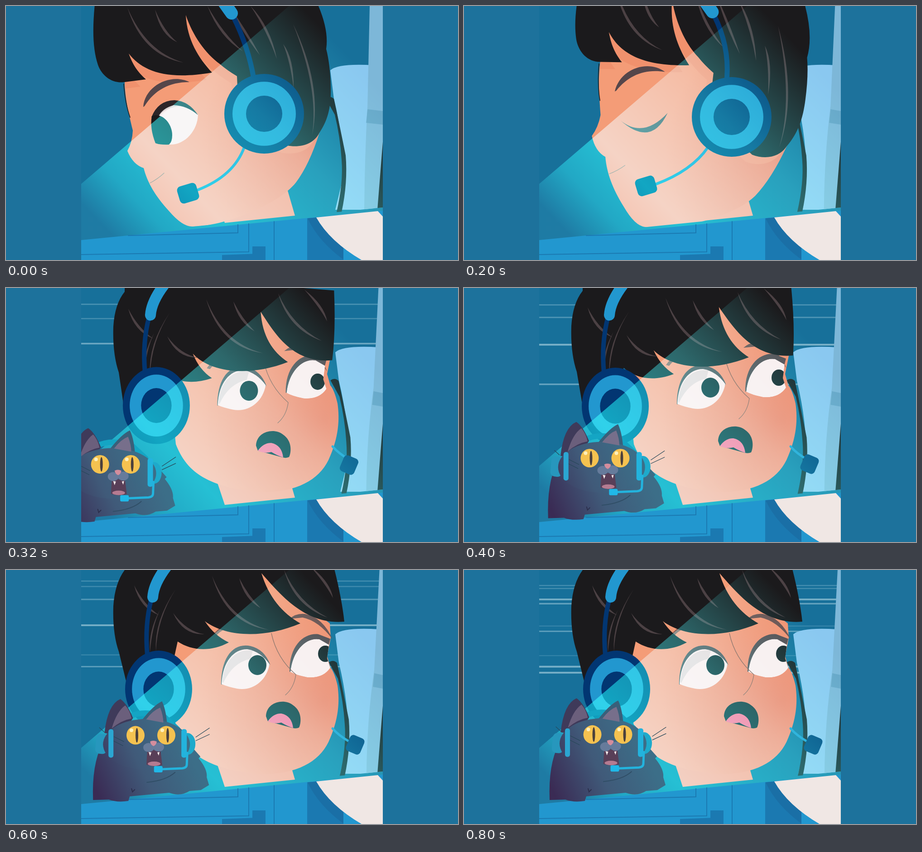
Animation of 998 by 561 pixels, one loop 0.88 s. Source, as an HTML page with a canvas:

```html
<!DOCTYPE html>
<html lang="en">
<head>
<meta charset="utf-8">
<title>Headset surprise</title>
<style>
html, body { margin: 0; width: 100%; height: 100%; overflow: hidden; background: #1d729c; }
canvas { display: block; }
</style>
</head>
<body>
<canvas id="stage" width="998" height="561"></canvas>
<script>
const ctx = document.getElementById('stage').getContext('2d');
const LOOP = 880, BLINK = 200, FRONT = 280, TURN = 320;
const HAIR = '#1b1a1c', STREAK = '#4c4144', LASH = '#55464a', WHITE = '#f8eeee';
const NECK = '#f29674', NAVY = '#023672', BLUE = '#2297cf', LINE = '#1b79b1', CYAN = '#23b3dd';

const skin = ctx.createRadialGradient(700, 290, 0, 700, 290, 270);
skin.addColorStop(0, '#ea7c5c');
skin.addColorStop(1, '#f49c77');

const fur = ctx.createLinearGradient(195, 490, 400, 400);
fur.addColorStop(0, '#3a2b54');
fur.addColorStop(.5, '#405a79');
fur.addColorStop(1, '#3c6e88');

const light = ctx.createLinearGradient(210, 480, 680, 30);
light.addColorStop(0, 'rgb(8,20,26)');
light.addColorStop(.14, 'rgb(12,100,108)');
light.addColorStop(.3, 'rgb(16,142,146)');
light.addColorStop(.65, 'rgb(20,86,88)');
light.addColorStop(1, '#000');

function fill(path, color) {
  ctx.fillStyle = color;
  ctx.fill(new Path2D(path));
}

function stroke(path, color, width) {
  ctx.strokeStyle = color;
  ctx.lineWidth = width;
  ctx.stroke(new Path2D(path));
}

function oval(x, y, rx, ry, color) {
  ctx.fillStyle = color;
  ctx.beginPath();
  ctx.ellipse(x, y, rx, ry, 0, 0, 7);
  ctx.fill();
}

function box(x, y, w, h, r, color, turn = 0) {
  shifted(x, y, () => {
    ctx.rotate(turn);
    ctx.fillStyle = color;
    ctx.beginPath();
    ctx.roundRect(-w / 2, -h / 2, w, h, r);
    ctx.fill();
  });
}

function shifted(x, y, draw) {
  ctx.save();
  ctx.translate(x, y);
  draw();
  ctx.restore();
}

function clipped(path, draw) {
  ctx.save();
  ctx.clip(new Path2D(path));
  draw();
  ctx.restore();
}

// Moves every point of a path by a rule.
function warp(path, move) {
  return path.replace(/(-?\d+) (-?\d+)/g, (_, x, y) => move(+x, +y).join(' '));
}

// Tapered hair strands spread evenly from the first to the last.
function fan(first, last = first, count = 2) {
  for (let i = 0; i < count; i++) {
    const [x, y, cx, cy, ex, ey] = first.map((v, j) => v + (last[j] - v) * i / (count - 1));
    fill(`M${x} ${y}Q${cx - 4} ${cy + 4} ${ex} ${ey}Q${cx + 4} ${cy - 4} ${x} ${y}Z`, STREAK);
  }
}

function random(seed) {
  const v = Math.sin(seed * 127.1) * 43758.5453;
  return v - Math.floor(v);
}

function earphone(x, y, rx, ry) {
  oval(x, y, rx, ry, NAVY);
  oval(x, y, rx * .795, ry * .805, BLUE);
  oval(x, y, rx * .455, ry * .455, NAVY);
}

function neck() {
  fill('M465 425L483 479L638 463L622 408Z', NECK);
}

function mouth(x, y) {
  shifted(x, y, () => {
    fill('M493 406C494 374 533 366 552 381C575 396 570 424 566 431Q560 434 552 432L497 417Z', HAIR);
    fill('M497 417Q510 399 527 400Q550 405 553 432Q540 428 527 420Q511 424 497 417Z', '#ef668e');
  });
}

function profile(t) {
  const k = Math.min(t / 120, 1.4);
  const face = 'M262 160C262 200 268 225 280 275Q279 300 268 320Q280 350 304 358C312 390 330 420 360 453Q390 488 412 487C480 487 600 440 640 390Q670 350 692 280L600 100L397 10L270 100Z';
  const hair = 'M200 -40C190 40 190 90 203 130C212 155 235 172 262 168L309 162C290 145 280 130 271 105C300 142 350 165 455 147C425 115 400 75 397 20C412 65 440 105 472 128Q488 142 510 155L511 180L560 270L620 308C650 314 680 305 692 280C712 250 718 220 717 180Q716 130 707 95Q715 40 670 -40Z';
  neck();
  ctx.save();
  ctx.transform(1, .11 * k, -.115 * k, 1 + .05 * k, 47 * k, -69 * k);
  fill(face, skin);
  clipped(face, () => shifted(-12, 16, () => fill(hair, '#f0916d')));
  stroke('M260 172Q263 215 274 246', HAIR, 1.5);
  fill(hair, HAIR);
  fan([268, 3, 305, 105, 392, 125], [329, 8, 345, 60, 378, 80]);
  fan([445, 0, 475, 65, 523, 100], [540, 0, 580, 50, 598, 117], 3);
  fan([612, 84, 632, 120, 635, 182], [634, 40, 695, 180, 676, 285]);
  fill('M303 223C307 175 365 148 405 168C360 168 328 186 306 221Z', LASH);
  if (t >= BLINK) {
    fill('M325 280Q380 310 424 250Q400 325 325 280Z', LASH);
  } else {
    fill('M330 240Q345 214 375 216Q405 220 424 240C423 275 395 308 360 306L335 302Z', WHITE);
    fill('M326 245Q345 212 380 217L392 221Q350 222 336 246Z', '#ddd5d5');
    fill('M321 246Q335 209 372 208Q404 210 424 241Q400 220 370 219Q345 226 336 245Z', '#2c2528');
    fill('M322 243C345 234 367 260 367 285Q367 300 360 306Q342 307 330 303Q317 270 322 243Z', HAIR);
  }
  stroke('M318 391Q335 382 349 369', '#9b6552', 1.2);
  ctx.restore();

  shifted(36 * k, -2 * k, () => {
    stroke(`M502 24Q535 90 ${547 - 12 * k} 160`, NAVY, 11);
    stroke('M481 -8L498 16', BLUE, 28);
  });
  stroke(`M${526 + 9 * k} 312Q503 ${375 - 8 * k} 424 ${406 - 9 * k}`, BLUE, 6);
  box(402, 413.5 - 11.5 * k, 44, 39, 9, NAVY, -.29);
  earphone(570 + 15 * k, 238 + 5 * k, 88, 88);
}

function front() {
  stroke('M690 382L706 392', BLUE, 6);
  box(718, 399, 37, 40, 8, NAVY, .45);
  neck();
  fill('M341 180L318 313C340 345 370 410 430 445C500 478 600 470 650 440C700 400 725 330 726 280L715 200L600 80L400 100Z', skin);
  oval(600, 262, 48, 36, '#f0906a40');
  oval(462, 272, 48, 34, '#f0906a28');
  fill('M557 297Q630 318 664 254Q661 335 557 297ZM405 306Q475 326 514 274Q485 345 405 306Z', LASH);
  fill('M557 297Q590 300 603 299L594 308ZM405 306Q440 315 466 311L452 318Z', HAIR);
  fill('M379 253Q430 193 494 251Q436 212 379 253ZM544 255C550 215 600 193 640 199L640 208Q580 203 544 255Z', LASH);
  fill('M290 0Q258 40 257 90Q257 130 262 160L340 215L341 183L378 188Q362 150 358 113C385 160 430 190 510 191C500 150 499 100 502 62C515 100 545 150 565 175Q600 200 637 197C638 240 650 290 690 306Q712 310 718 295Q726 200 727 80Q722 60 725 40Q723 15 716 0Z', HAIR);
  fan([395, 25, 420, 115, 500, 147], [453, 28, 465, 75, 500, 102]);
  fan([562, 0, 575, 85, 643, 132], [640, 0, 700, 60, 718, 152], 3);
  fan([268, 158, 280, 100, 314, 45]);
  fan([280, 33, 315, 8, 382, 0]);
  stroke('M532 234Q536 285 550 324Q548 345 536 366', '#7a4b40', 1.2);
  mouth(0, 0);
  stroke('M257 46Q239 100 239 168', NAVY, 11);
  stroke('M286 -8Q263 16 261 39', BLUE, 25);
  earphone(260, 247, 84, 88);
}

// The head eases into its final pose; the hair trails behind the features.
function turned(t) {
  const drag = Math.min((Math.max(0, 600 - t) / 200) ** 2, 1.3);
  const rest = drag * drag;
  const hair = warp(
    'M262 0Q240 30 237 80Q235 140 249 180L265 245L340 240L372 190L379 158C410 178 450 182 492 160Q460 145 439 113C485 148 570 152 650 118C610 95 580 60 564 7C604 52 660 122 747 114Q740 50 715 -40L262 -40Z',
    (x, y) => {
      const inner = Math.max(0, Math.min(1, (x - 250) / 140));
      const reach = Math.max(0, Math.min(1, (x - 240) / 300));
      return [x - .18 * y * inner * drag, y + (4 + 31 * reach) * drag];
    });
  neck();
  fill('M379 130L360 200L375 345C400 410 450 440 560 451C640 452 690 425 712 380C735 330 737 290 732 255Q725 225 716 215L709 190L717 150L715 118L560 0Z', skin);
  shifted(-9 * drag, 24 * drag, () => {
    fill('M626 108Q640 95 660 97Q700 105 721 153Q690 112 655 105Z', '#6b4c4a');
    fill('M455 146Q465 130 485 122L497 128Q475 130 462 148Z', '#8a5c52');
  });
  shifted(-5 * rest, 4 * rest, () => {
    fill('M475 253C475 195 500 160 540 168Q570 175 583 208L570 230L520 240Z', LASH);
    fill('M476 252C478 200 505 174 533 175Q562 180 582 208C575 245 545 268 510 262Q490 258 476 252Z', WHITE);
    fill('M478 248C480 200 510 172 545 178L540 196Q500 205 480 249Z', '#e4d8d9');
    fill('M626 225C625 165 660 138 690 142L716 152L712 167L690 200Z', LASH);
    oval(555 - 6 * rest, 210 + 6 * rest, 20, 22, HAIR);
    const eye = 'M628 225C633 175 665 148 692 153L713 165L709 195L716 216Q700 240 665 237Q640 232 628 225Z';
    clipped(eye, () => {
      fill(eye, WHITE);
      oval(705 - 5 * rest, 185 + 9 * rest, 16, 18, HAIR);
    });
  });
  shifted(-10 * rest, 13 * rest, () =>
    stroke('M586 140Q598 195 640 231Q636 260 617 276', '#8a5143', 1.3));
  mouth(81 - 13 * rest, -83 + 15 * rest);

  fill(hair, HAIR);
  shifted(-10 * drag, 9 * drag, () => {
    fan([283, 34, 300, 80, 338, 100], [369, 95, 395, 140, 438, 142]);
    fan([375, 42, 330, 110, 331, 180], [340, 88, 318, 130, 318, 182]);
    fan([455, 13, 490, 115, 580, 132], [515, 18, 530, 60, 562, 84]);
    fan([614, 0, 640, 75, 710, 105], [672, -8, 712, 30, 722, 62]);
  });

  stroke('M721 350Q735 366 758 379', BLUE, 5);
  box(771 - 8 * rest, 386 + 3 * rest, 34, 38, 8, NAVY, .4);
  shifted(-3 * rest, 0, () => {
    stroke('M321 64Q306 120 312 188', NAVY, 10);
    stroke('M355 -8Q326 30 324 60', BLUE, 24);
    earphone(337, 263 - 2 * rest, 74, 85);
  });
}

// Slides in from the left, overshoots a little and settles.
function cat(t) {
  const age = t - FRONT;
  const x = 11 * Math.exp(-(((age - 215) / 95) ** 2)) - 225 * Math.exp(-age / 35);
  const look = -6 * Math.exp(-age / 200);
  shifted(x + 2, 22 * Math.exp(-age / 30), () => {
    fill('M187 508Q184 430 207 385L400 385L424 412L420 416Q440 440 438 458L443 475L425 486L400 488Q380 501 355 492L268 500L265 510Q240 514 222 507Z', fur);
    stroke('M272 483L274 490L279 485', '#2c2f4c', 2);
  });
  shifted(x, 38 * Math.exp(-age / 110), () => {
    box(208, 382, 26, 44, 10, '#2797bd', .1);
    oval(398, 382, 17, 24, '#1eaacb');
    shifted(-look, 0, () => {
      stroke('M268 322Q300 306 345 322L375 350', '#14a5c4', 12);
      fill('M213 358Q220 295 248 283Q263 293 276 325L250 365Z', '#3f3a5a');
      fill('M296 329Q322 296 340 288Q350 308 352 350Z', '#39607a');
    });
    oval(307, 383, 96, 56, fur);
    shifted(-look, 0, () => {
      fill('M229 348Q240 310 259 297Q269 308 273 326Q250 330 229 348Z', '#6b5f7c');
      fill('M305 328Q320 308 336 302Q343 320 343 335Z', '#776f8b');
    });
    stroke('M416 367L446 347M416 375L446 361M214 356L203 346M235 366L257 377M233 375L255 386', '#264758', 1.2);
    shifted(look, 0, face);
    stroke('M308 467Q350 463 370 445', '#304e66', 2);
    box(228.5, 381, 11, 63, 5, '#2ba6d2');
    box(390, 381, 12, 63, 5, CYAN);
    stroke('M397 402L396 427Q396 435 386 436L340 438', CYAN, 5);
    box(333, 438, 19, 14, 3, '#20b8e8');
  });

  function face() {
    for (const x of [284, 352]) {
      oval(x, 363, 20, 20.5, '#f5c250');
      oval(x + 3, 363, 3, 16, '#4b403c');
      oval(x - 9, 352, 4, 4, '#fff0bb');
    }
    fill('M310 396H339L343 429Q325 434 308 428Z', '#593f58');
    oval(325, 426, 14, 5, '#b57b91');
    oval(313, 390, 12, 10, '#667b9b');
    oval(335, 389, 12, 10, '#667b9b');
    fill('M316 377Q323 373 331 377Q330 384 324 387Q318 385 316 377Z', '#d48d9d');
    fill('M313 400L316 409L319 401ZM332 401L335 408L337 400Z', WHITE);
  }
}

// Streaks of light flicker around a few rows, more of them as time goes on.
function speedLines(t) {
  const count = Math.floor((t - 160) / 90) + 2;
  for (let i = 0; t >= FRONT && i < count; i++) {
    const row = [36, 123, 66, 211, 188][i % 5];
    const y = row + (random(t + i) - .5) * (i < 5 ? 4 : 30);
    const glow = random(t * 3 + i);
    ctx.fillStyle = `rgba(205,232,240,${.15 + .4 * glow})`;
    ctx.fillRect(166, y - 1, 666, 2 + 2 * glow);
  }
}

function backdrop(t) {
  const calm = Math.exp(-t / 150);
  const sway = 8 * Math.exp(-(((t - FRONT) / 50) ** 2)) - 7 * calm;
  const top = 825 - 22 * calm, foot = 796 - 5 * calm;
  const mid = top * .6 + foot * .4;
  speedLines(t);
  shifted(-11 * Math.max(0, 1 - t / 100), 0, () =>
    fill('M727 142Q745 126 824 131V450H738L755 380Q758 300 735 205Z', '#8ac8f0'));
  fill(`M${top} 0H832V450H${foot}Q${foot + 1} 330 ${mid} 220Z`, '#7db7d8');
  fill(`M${mid} 228L832 232V262L${mid - 3} 258Z`, '#67a5c7');
  fill('M832 300V450H820Z', HAIR);
  shifted(sway, 0, () => fill(
    'M713 204Q722 197 731 205Q745 270 757 330Q762 390 748 455H737Q752 390 748 340Q745 290 733 240Z', HAIR));
}

function beam() {
  ctx.globalCompositeOperation = 'screen';
  fill('M166 393L625 0H832V561H166Z', light);
  ctx.globalCompositeOperation = 'source-over';
}

function desk() {
  fill('M166 517L832 452V561H166Z', BLUE);
  stroke('M270 507L512 501V483M166 549L536 543V481M592 476V561', LINE, 2);
  fill('M544 531H573V561H544ZM477 550L554 547V561H477ZM665 469L688 467L745 535V561H665Z', LINE);
  fill('M666 469L688 467L745 535V560Q690 520 666 469Z', '#1a6fa6');
  fill('M685 467L821 453L832 465V561H785Q715 520 685 467Z', '#f0e7e4');
}

// Drawings are held in a repeating 80, 40, 80 ms rhythm.
function hold(time) {
  const beat = time % 200;
  return time - beat + (beat < 80 ? 0 : beat < 120 ? 80 : 120);
}

function render(time) {
  const t = hold(time % LOOP);
  fill('M0 0H998V561H0Z', '#1d729c');
  clipped('M166 0H832V561H166Z', () => {
    fill('M166 0H832V561H166Z', '#17709a');
    clipped('M166 0H832V445L166 512Z', () => {
      backdrop(t);
      (t < FRONT ? profile : t < TURN ? front : turned)(t);
    });
    beam();
    desk();
    if (t >= FRONT) cat(t);
  });
}

ctx.lineCap = 'round';
const start = performance.now();
function tick() {
  render(performance.now() - start);
  requestAnimationFrame(tick);
}
tick();
</script>
</body>
</html>
```
